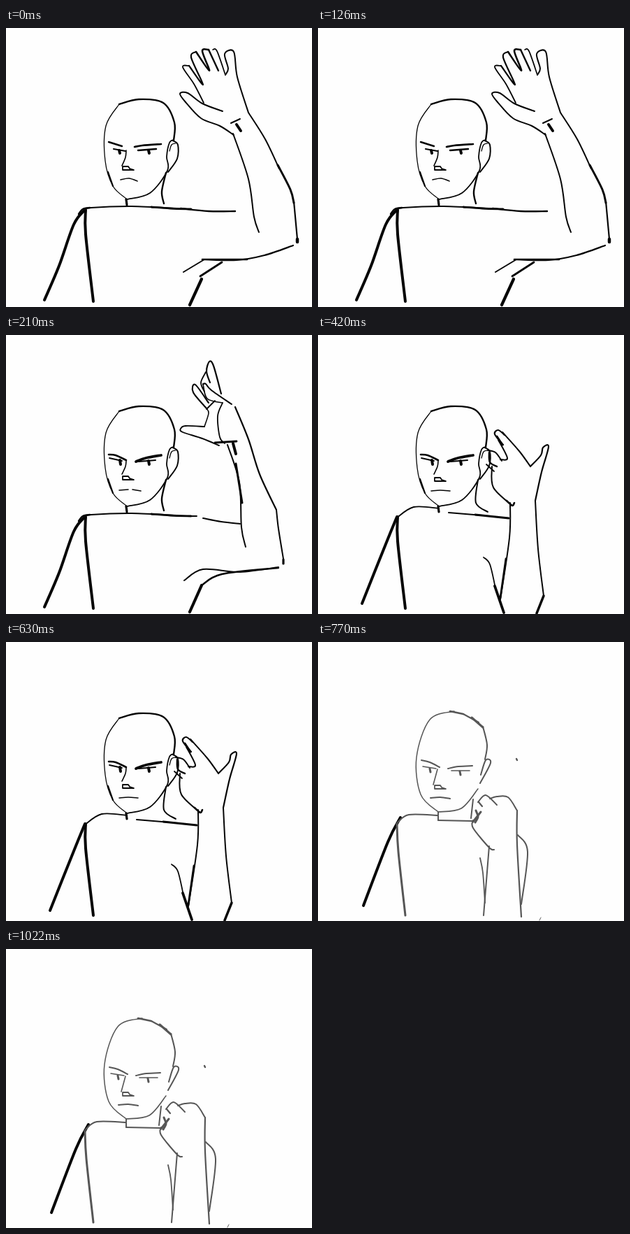
Recreate the animation shown at these times as an HTML page. Size 438 px wide and 399 px high, loop 1.19 s.

```html
<!DOCTYPE html>
<html lang="en">
<head>
<meta charset="utf-8">
<title>Waving figure</title>
<style>
  html, body { margin: 0; width: 100%; height: 100%; overflow: hidden; background: #fefefe; }
  svg { display: block; width: 438px; height: 399px; }
  path { fill: none; stroke-linecap: round; stroke-linejoin: round; }
</style>
</head>
<body>
<svg id="stage" viewBox="0 0 438 399"></svg>
<script>
const INK = "#050505", PENCIL = "#565656";
const stage = document.getElementById("stage");
const poses = [];
let layer, color;

function add(tag, parent, attributes = {}) {
  const node = document.createElementNS("http://www.w3.org/2000/svg", tag);
  for (const key in attributes) node.setAttribute(key, attributes[key]);
  return parent.appendChild(node);
}

// Smooth curve through a few points.
function smooth(points) {
  const at = i => points[Math.max(0, Math.min(points.length - 1, i))];
  let d = `M${points[0]}`;
  for (let i = 0; i < points.length - 1; i++) {
    const a = at(i - 1), b = at(i), c = at(i + 1), e = at(i + 2);
    const first = b.map((v, k) => v + (c[k] - a[k]) / 6);
    const second = c.map((v, k) => v - (e[k] - b[k]) / 6);
    d += `C${first} ${second} ${c}`;
  }
  return d;
}

function pen(width, text) {
  const points = text.split(" ").map(p => p.split(",").map(Number));
  add("path", layer, { d: smooth(points), stroke: color, "stroke-width": width });
}

function pose(hold, ...parts) {
  layer = add("g", stage);
  color = INK;
  parts.forEach(part => part());
  poses.push({ hold, layer });
}

function nose(y) {
  add("path", layer, { d: `M167 ${y}h8l2 3l6 2h-16z`, stroke: color, "stroke-width": 1.8 });
}

function head() {
  pen(1.3, "172,244 153,226 142,190 143,140 162,109");
  pen(2.4, "162,109 190,102 225,107 241,135 240,161");
  pen(2.2, "146,206 153,226");
  pen(1.8, "173,245 206,236 231,204 230,184 234,164 240,160");
  pen(2, "239,161 246,167 245,187 232,206");
  pen(1.3, "234,176 237,167 243,165");
  pen(3.2, "172,245 173,253");
}

function bust() {
  pen(4, "114,260 114,295 125,391");
}

function openShoulder() {
  pen(2.4, "229,207 223,234 226,251");
  pen(2.5, "120,257 110,259 104,266");
  pen(4, "113,260 97,281 76,340 55,389");
  pen(1.8, "114,260 122,257 180,255 245,258");
  pen(2.8, "208,256 235,258 265,259");
}

function calmFace() {
  pen(2.4, "147,163 166,169");
  pen(2.6, "184,170 195,168 222,166");
  pen(2.2, "154,173 171,176");
  pen(4, "162,175 163,179");
  pen(2.4, "189,175 215,173");
  pen(4, "204,175 205,179");
  pen(1.6, "172,175 171,185 166,197");
  pen(1.6, "164,217 176,215 188,219");
  nose(198);
}

function scowl() {
  pen(2.6, "147,171 157,172 172,179");
  pen(1.8, "148,176 166,180");
  pen(4, "163,179 164,185");
  pen(3.8, "186,181 200,176 222,172");
  pen(2, "190,181 214,179");
  pen(4, "204,180 205,185");
  pen(1.6, "172,180 171,188 166,199");
}

function raisedHand() {
  pen(2, "310,119 281,108 260,93 249,94 257,106 279,129 306,140 326,153");
  pen(1.8, "283,107 269,80 253,56 262,54");
  pen(2.2, "262,54 282,81 265,42 272,34");
  pen(2.6, "272,34 291,61 281,33 290,31");
  pen(2.4, "290,31 304,61");
  pen(1.7, "296,31 302,33 314,67");
  pen(2, "314,67 318,58 313,37 326,34 331,70 347,121");
  pen(2, "322,136 335,130");
  pen(4, "330,138 336,147");
}

function raisedArm() {
  pen(2, "347,121 371,159 391,201");
  pen(3, "389,196 407,231 412,250");
  pen(2.2, "412,248 417,302");
  pen(4.5, "417,302 417,306");
  pen(2, "325,151 347,216 355,270 362,292");
  pen(2.2, "411,311 370,325 330,332 284,331");
  pen(2.6, "345,331 281,331");
  pen(2, "284,331 254,349");
  pen(2.8, "278,355 309,335");
  pen(4.2, "280,359 263,396");
  pen(2.4, "250,258 290,262 328,262");
}

function turnedHand() {
  pen(1.9, "284,131 257,130 250,134 253,139 281,148 305,158");
  pen(1.6, "284,131 290,112 287,105");
  pen(2.1, "287,105 268,82 271,71 290,97");
  pen(1.8, "284,81 279,68 286,53");
  pen(2.2, "292,68 287,52 291,38 297,44 308,84");
  pen(2, "282,70 286,70 294,79 323,99");
  pen(1.7, "282,70 288,91 310,97");
  pen(1.8, "310,97 303,116 306,146 313,155");
  pen(1.8, "287,106 299,94");
  pen(2.8, "299,154 330,152");
  pen(4, "325,155 329,170");
}

function turnedArm() {
  pen(2.2, "328,103 347,149 363,199 387,250");
  pen(2, "387,250 390,277 397,320");
  pen(3.2, "397,321 397,327");
  pen(2, "317,157 334,211 337,275 343,303");
  pen(3, "329,184 338,240");
  pen(2, "282,262 308,267 335,270");
  pen(2, "390,332 335,339 282,335 255,351");
  pen(2.4, "280,358 309,342 390,333");
  pen(4.2, "280,358 263,396");
  pen(1.8, "262,259 273,259");
  pen(1.6, "162,222 175,221");
  pen(1.6, "181,221 193,223");
  nose(202);
}

function handAtEar() {
  pen(2.2, "265,157 253,142 258,136 267,143");
  pen(3, "256,145 264,157");
  pen(2, "264,139 288,166 304,188");
  pen(2.2, "304,188 319,172 322,161 330,160 320,196 311,237");
  pen(2, "258,150 271,176 261,178");
  pen(2, "243,165 254,168 263,180");
  pen(2.5, "245,168 246,182 256,188");
  pen(1.8, "241,185 252,195");
  pen(2, "249,188 251,218 278,244");
  pen(2.6, "270,237 278,244 281,240");
}

function armAtEar() {
  pen(2, "311,237 315,306 323,373");
  pen(3.4, "323,373 313,398");
  pen(2, "275,240 274,290 261,378");
  pen(2.8, "269,320 261,376");
  pen(1.8, "237,318 246,328 254,362");
  pen(3.8, "253,359 266,397");
  pen(2, "187,254 235,258");
  pen(2.8, "225,257 273,262");
  pen(2, "229,207 226,240 243,253");
  pen(1.8, "112,262 137,246 173,248");
  pen(4, "113,260 97,299 63,384");
  pen(1.6, "162,223 175,222 189,223");
  nose(204);
}

function lastArm() {
  pen(4, "118,251 100,286 65,377");
  color = PENCIL;
}

function pencilHead() {
  pen(1.5, "172,243 147,218 141,165 160,111 195,99");
  pen(2.5, "189,99 208,103");
  pen(2, "208,103 230,115");
  pen(3, "220,108 236,122");
  pen(2, "236,121 242,147 239,168");
  pen(1.6, "172,243 205,238 229,210");
  pen(2, "233,190 240,169 247,173 232,202");
  pen(2, "172,243 172,255");
  pen(2, "172,255 221,256");
  pen(2, "222,225 219,252");
}

function pencilFace() {
  pen(2, "148,169 160,172 174,179");
  pen(2, "186,181 201,178 221,177");
  pen(1.5, "150,178 169,181");
  pen(3, "160,181 161,186");
  pen(1.6, "191,184 217,184");
  pen(3, "203,185 204,190");
  pen(1.6, "171,182 165,204");
  pen(2, "161,223 175,222 189,224");
  nose(205);
}

function fist() {
  pen(2.2, "114,258 130,247 172,248");
  pen(3, "113,260 115,300 125,391");
  pen(2, "229,229 240,219 256,233");
  pen(2, "246,224 256,221 272,222 285,241");
  pen(2.2, "285,241 285,290 291,393");
  pen(2.2, "230,229 235,235");
  pen(3, "226,241 229,250 225,258");
  pen(3, "233,243 222,257");
  pen(2, "222,255 222,266 245,294 252,297");
  pen(2, "245,292 237,391");
  pen(1.8, "232,309 236,330 239,373");
  pen(2, "286,276 300,300 291,375");
  pen(2.4, "284,167 285,169");
  pen(1, "317,398 319,394");
}

pose(210, head, bust, openShoulder, calmFace, raisedHand, raisedArm);
pose(210, head, bust, openShoulder, scowl, turnedHand, turnedArm);
pose(350, head, bust, scowl, handAtEar, armAtEar);
pose(420, lastArm, pencilHead, pencilFace, fist);

const loop = poses.reduce((sum, p) => sum + p.hold, 0);

function show(time) {
  let rest = time % loop, current = 0;
  while (rest >= poses[current].hold) rest -= poses[current++].hold;
  poses.forEach((p, i) => p.layer.style.display = i === current ? "" : "none");
}

const start = performance.now();
function tick() {
  show(performance.now() - start);
  requestAnimationFrame(tick);
}
tick();
</script>
</body>
</html>
```
